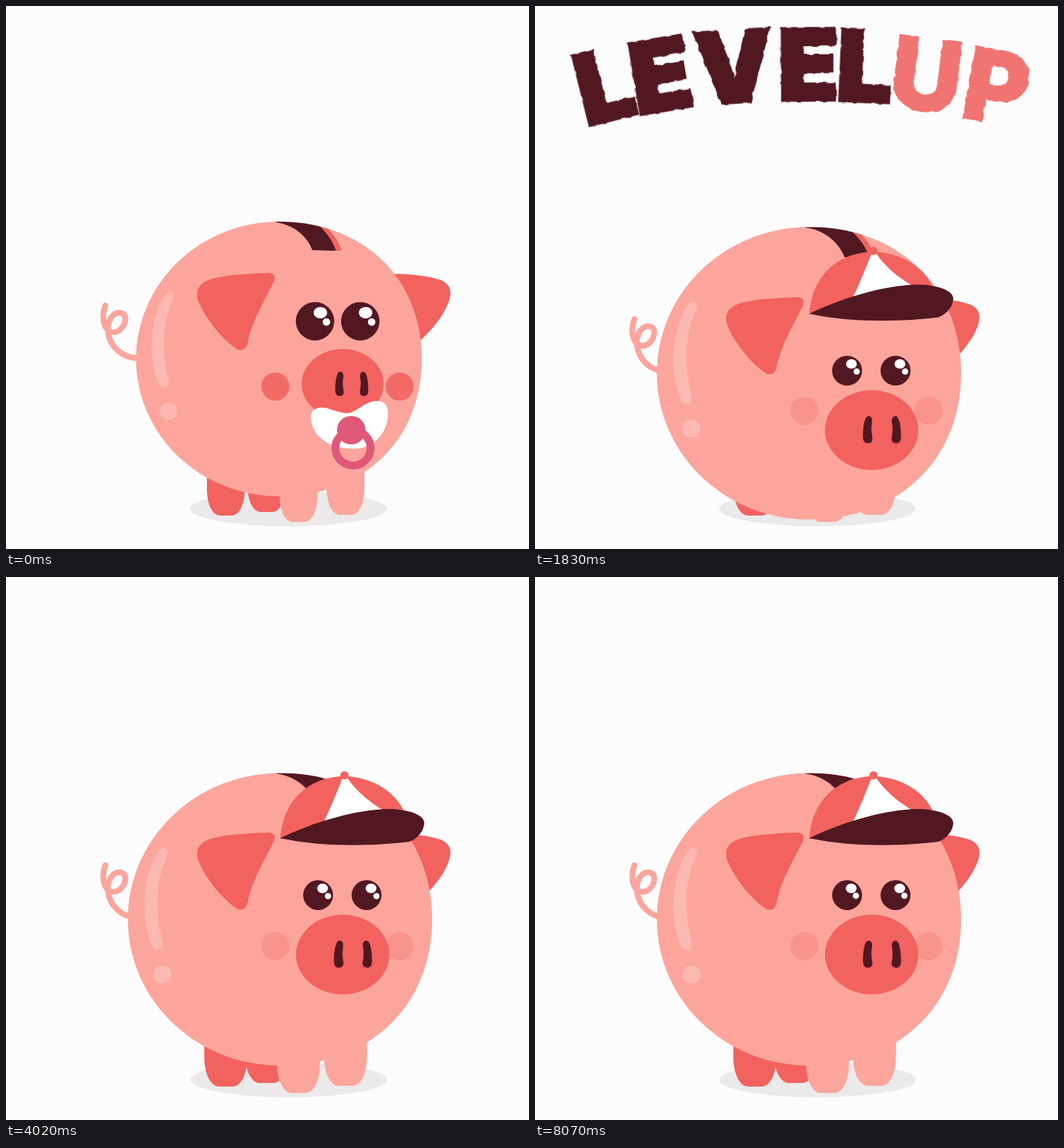
These frames come from a looping animation (734x763 px, 8.1 s). An HTML page:

```html
<!DOCTYPE html>
<html lang="en">
<head>
<meta charset="utf-8">
<title>Level up</title>
<style>
  html, body { margin: 0; width: 100%; height: 100%; overflow: hidden; background: #fcfcfc; }
  svg { display: block; width: 100vw; height: 100vh; }
  text { font-family: Inter, sans-serif; font-size: 138px; }
</style>
</head>
<body>
<svg id="stage" viewBox="0 0 734 763" xmlns="http://www.w3.org/2000/svg"></svg>
<script>
const PINK = '#fba59d', RED = '#f2625e', DARK = '#521822', ROSE = '#df5878', SHINE = '#fcb9b2', CORAL = '#f07471';
const LOOP = 8100, SWAP = 1410;

const ellipse = (x, y, rx, ry, fill, more = '') =>
  `<ellipse cx="${x}" cy="${y}" rx="${rx}" ry="${ry}" fill="${fill}" ${more}/>`;
const dot = (x, y, r, fill, more) => ellipse(x, y, r, r, fill, more);
const shape = (d, fill) => `<path d="${d}" fill="${fill}"/>`;
const part = (name, inner) => `<g data-part="${name}">${inner}</g>`;

// ---- pig pieces ----
const BELLY = 'M383 303C501 303 583.5 382 583.5 496C583.5 610 501 689 383 689A200.5 193 0 0 1 383 303Z';

const leg = (x, y, s, fill) => `<g transform="translate(${x} ${y}) scale(${s})">` +
  shape('M-26.5 -90V-38C-26.5 -14 -18 0 -8 0H8C18 0 26.5 -14 26.5 -38V-90Z', fill) + '</g>';

const tail = dy => `<path transform="translate(0 ${dy})" fill="none" stroke="${PINK}" stroke-width="8" stroke-linecap="round"
  d="M139.5 421C135 433 136 443 139 450C143 459 153 461 160 455C169 447 171 432 160 431C149 430 142 443 143 457C145 476 160 495 188 495"/>`;

const body = fit => `<g transform="${fit}">` +
  shape(BELLY, PINK) +
  '<g clip-path="url(#belly)">' +
  shape('M430 300C450 316 458 328 463 344L471 344C466 328 457 317 440 300Z', RED) +
  shape('M370 298L379 304C402 307 422 322 430 343L463 344C458 328 449 316 430 300Z', DARK) +
  '</g>' +
  shape('M230 402C237 402 236 409 232 418C219 448 219 490 228 524C231 537 222 541 215 532C199 500 201 440 222 408Q226 402 230 402Z', SHINE) +
  dot(228, 569, 12, SHINE) + '</g>';

const leftEar = shape('M369 375Q380 376 376 387C360 420 346 440 339 474Q336 486 326 483C300 468 275 430 269 412Q264 390 290 383C315 377 345 376 369 375Z', RED);
const rightEar = shape('M530 376C565 376 592 379 610 385Q627 392 623 410C618 430 600 455 570 480Z', RED);

const nostril = (x, y, sx, sy) => `<g transform="translate(${x} ${y}) scale(${sx} ${sy})">` +
  shape('M1 -17C6 -17 6 -11 5 -6C4 0 5 5 6 11Q6 17 0 17Q-6 17 -6 9C-6 -4 -4 -17 1 -17Z', DARK) + '</g>';

const babyEye = x => dot(x, 443, 27, DARK) + ellipse(x + 7.5, 431, 9.5, 8, '#fff') + dot(x + 16, 444, 5.3, '#fff');
const grownEye = x => dot(x, 447, 21, DARK) +
  part('glint', ellipse(x + 6, 437.5, 7.6, 6.7, '#fff')) +
  part('spark', dot(x + 13, 448, 4.4, '#fff'));

const pacifier =
  shape('M428 580C426 568 436 562 450 565C463 569 474 573 481 572C490 571 505 556 518 555C532 554 537 562 536 575C535 600 517 622 487 622C452 622 430 604 428 580Z', '#fff') +
  `<circle cx="487" cy="621" r="24.7" fill="none" stroke="${ROSE}" stroke-width="11"/>` +
  dot(484.5, 596, 20, ROSE);

const hat =
  shape('M385 368C388 310 430 280 475 280C515 281 545 302 558 328L540 350Z', RED) +
  shape('M473 281C465 300 456 324 447 342L500 340L530 328C508 315 490 299 478 281Z', '#fff') +
  dot(475, 278.7, 5.8, RED) +
  shape('M385 367C430 345 490 327 535 326C565 326 587 334 587 346C586 360 574 369 566 372C510 379 440 379 385 367Z', DARK);

function pig(o) {
  const lift = inner => part('ears', `<g transform="translate(0 ${o.rise})">${inner}</g>`);
  const cheek = x => dot(x, 534.7, 19.7, RED, `opacity="${o.blush}"`);
  return `<g id="${o.id}">` +
    part('body', tail(o.rise)) + lift(rightEar) +
    leg(308.5, 716, o.leg, RED) + leg(365.5, 711, o.leg, RED) +
    leg(410.5, 725, o.leg, PINK) + leg(476.5, 715, o.leg, PINK) +
    part('body', body(o.fit)) +
    lift(leftEar + cheek(378) + cheek(552.5)) +
    part('face', o.face) + '</g>';
}

const baby = pig({
  id: 'baby', rise: 0, blush: 0.85, leg: 1, fit: '',
  face: babyEye(433.7) + babyEye(497.2) + ellipse(472.5, 531, 57.5, 49, RED) +
    nostril(468, 531, 1, 1) + nostril(502.5, 531, -1, 1) + pacifier
});
const grown = pig({
  id: 'grown', rise: -16, blush: 0.25, leg: 1.14,
  fit: 'translate(384.5 481) scale(1.065) translate(-383 -496)',
  face: grownEye(438) + grownEye(506) + ellipse(472.5, 530.5, 65.5, 56, RED) +
    nostril(467, 530, 1.12, 1.12) + nostril(507, 530, -1.12, 1.12) + hat
});

// ---- lettering: glyph, base centre, tilt ----
const letters = [
  ['L', 111, 161, -14], ['E', 185, 148, -9.5], ['V', 282, 137, -3.5], ['E', 384, 134, -0.3],
  ['L', 462, 136, 2.5], ['U', 543, 148, 7], ['P', 640, 165, 10.5]
].map(([ch, x, y, tilt], i) => {
  const up = i > 4, k = up ? i - 5 : i;
  return { ch, x, y, tilt, up, enter: (up ? 1310 : 1160) + k * 15, leave: (up ? 3640 : 3260) - k * 20 };
});

const pen = document.createElement('canvas').getContext('2d');
function inkShift(ch, weight) {
  pen.font = `${weight} 138px Inter, sans-serif`;
  const m = pen.measureText(ch);
  return (m.actualBoundingBoxLeft - m.actualBoundingBoxRight) / 2;
}

const lettering = letters.map(l => {
  const [weight, edge, ink] = l.up ? [800, 4, CORAL] : [900, 5, DARK];
  return `<g transform="translate(${l.x} ${l.y}) rotate(${l.tilt})"><g clip-path="url(#slit)">` +
    `<g class="glyph"><text x="${inkShift(l.ch, weight)}" y="${-edge / 2}" font-weight="${weight}" ` +
    `fill="${ink}" stroke="${ink}" stroke-width="${edge}" filter="url(#rough)">${l.ch}</text></g></g></g>`;
}).join('');

const stage = document.getElementById('stage');
stage.innerHTML = `<defs>
  <clipPath id="belly"><path d="${BELLY}"/></clipPath>
  <clipPath id="slit"><rect x="-100" y="-150" width="200" height="161.5"/></clipPath>
  <filter id="rough" x="-20%" y="-20%" width="140%" height="140%" color-interpolation-filters="sRGB">
    <feTurbulence type="fractalNoise" baseFrequency="0.11" numOctaves="1" seed="4"/>
    <feDisplacementMap in="SourceGraphic" scale="5" xChannelSelector="R" yChannelSelector="G"/>
  </filter></defs>` +
  ellipse(396.5, 706.5, 138, 24.5, '#ebe9e9') + lettering + `<g id="pig">${baby}${grown}</g>`;

// ---- motion ----
const all = q => [...stage.querySelectorAll(q)];
const parts = {};
for (const name of ['body', 'ears', 'face', 'glint', 'spark']) parts[name] = all(`[data-part=${name}]`);
const glyphs = all('.glyph');
const [pigEl, babyEl, grownEl] = ['pig', 'baby', 'grown'].map(id => document.getElementById(id));

const clamp = v => Math.max(0, Math.min(1, v));
const span = (t, a, b) => clamp((t - a) / (b - a));
const easeIn = u => u * u;
const easeOut = u => 1 - (1 - u) * (1 - u);
const smooth = u => u * u * (3 - 2 * u);

// keys: [time, value, ease into this key]
function track(t, keys) {
  let [t0, v0] = keys[0];
  for (const [t1, v1, ease] of keys) {
    if (t < t1) return v0 + (v1 - v0) * ease(span(t, t0, t1));
    t0 = t1; v0 = v1;
  }
  return v0;
}
const jump = [[1150, 0, smooth], [1420, -102, easeOut], [1700, 0, easeIn]];
const squash = [[900, 0, smooth], [1020, 1, smooth], [1140, 1, smooth], [1240, -0.4, smooth], [1280, -0.4, smooth],
  [1430, 0, smooth], [1700, 0, smooth], [1830, 1.46, easeOut], [2130, 0, smooth]];

const shift = (els, x, y) => els.forEach(e => e.setAttribute('transform', `translate(${x} ${y})`));

function draw(t) {
  const q = track(t, squash);
  shift([pigEl], 0, track(t, jump));
  shift(parts.body, 0, q * 24);
  shift(parts.ears, 0, q * (q < 0 ? 40 : 34.2));
  shift(parts.face, 0, q * (q < 0 ? 40 : 44.8));
  babyEl.style.display = t < SWAP ? '' : 'none';
  grownEl.style.display = t < SWAP ? 'none' : '';

  const w = Math.cos((t - 4020) / 1200 * 2 * Math.PI);
  shift(parts.glint, 0.3 * w, 0);
  shift(parts.spark, 0.9 * w, 0.3 * w);

  letters.forEach((l, i) => {
    const shown = easeOut(span(t, l.enter, l.enter + 480));
    const gone = Math.pow(span(t, l.leave - 340, l.leave), 1.5);
    const drop = 1 - shown + gone;
    glyphs[i].setAttribute('transform', `translate(0 ${drop * 120}) rotate(${drop * 6.5})`);
    glyphs[i].style.display = drop < 1 ? '' : 'none';
  });
}

const start = performance.now();
function tick() {
  draw((performance.now() - start) % LOOP);
  requestAnimationFrame(tick);
}
tick();
</script>
</body>
</html>
```
